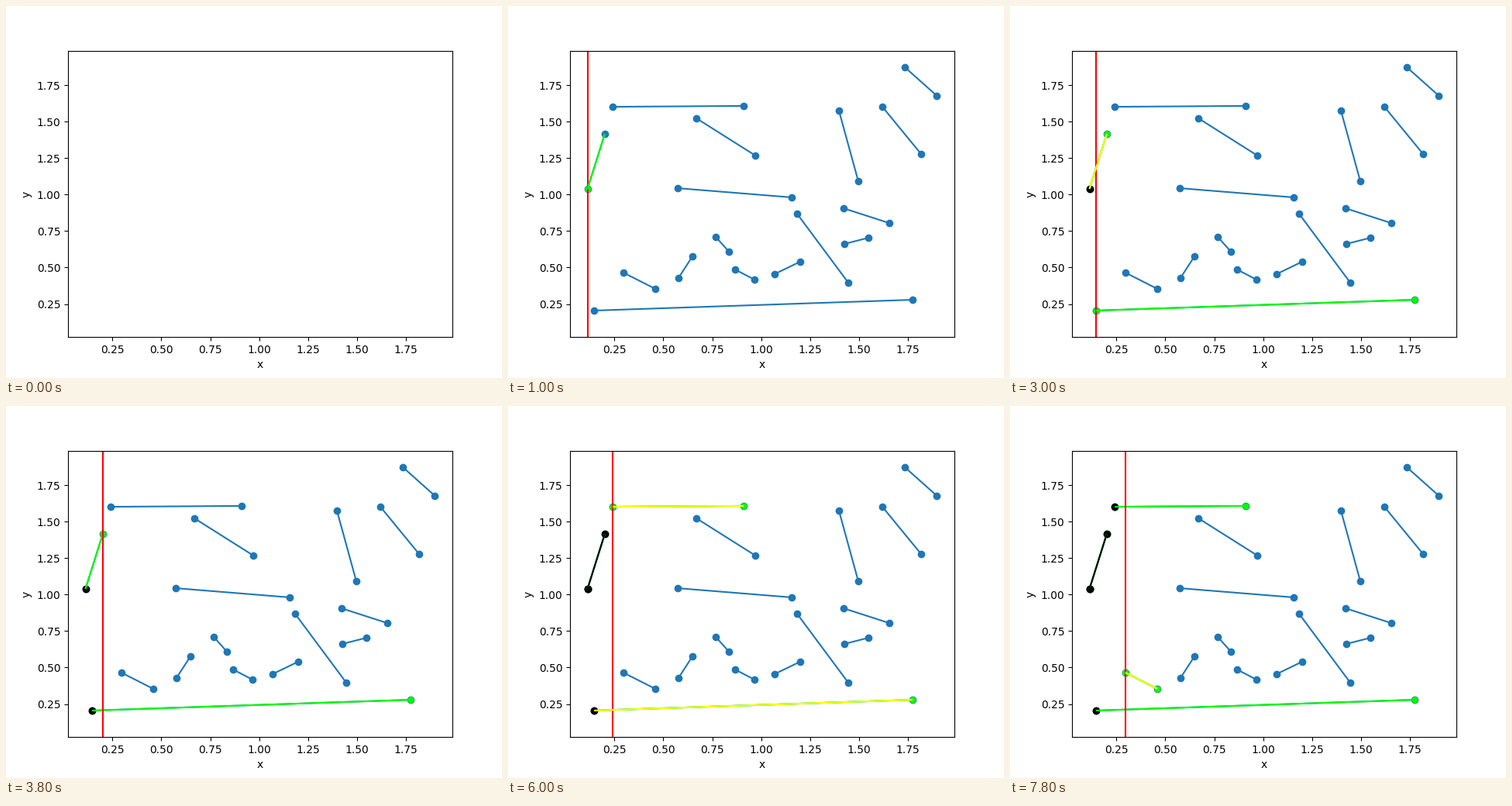
These frames come from a looping animation (640 px wide and 480 px high, 8000 ms). A matplotlib script:

```python
import matplotlib.pyplot as plt
from matplotlib.animation import FuncAnimation
from matplotlib.collections import LineCollection

FRAMES, INTERVAL = 40, 200

# Input of the sweep: (left end, right end) of each segment
SEGMENTS = [
    ((0.1125, 1.039), (0.201, 1.416)), ((0.146, 0.205), (1.774, 0.279)),
    ((0.241, 1.602), (0.910, 1.608)), ((0.296, 0.465), (0.459, 0.354)),
    ((0.574, 1.044), (1.156, 0.981)), ((0.577, 0.428), (0.649, 0.577)),
    ((0.669, 1.523), (0.970, 1.268)), ((0.768, 0.710), (0.835, 0.609)),
    ((0.867, 0.486), (0.966, 0.417)), ((1.068, 0.455), (1.199, 0.540)),
    ((1.183, 0.869), (1.445, 0.396)), ((1.397, 1.576), (1.496, 1.092)),
    ((1.421, 0.906), (1.654, 0.805)), ((1.425, 0.662), (1.548, 0.704)),
    ((1.619, 1.602), (1.817, 1.278)), ((1.734, 1.873), (1.8977, 1.677)),
]
POINTS = [p for seg in SEGMENTS for p in seg]


def padded_range(values, margin=0.05):
    lo, hi = min(values), max(values)
    pad = margin * (hi - lo)
    return lo - pad, hi + pad


LIMITS = padded_range([x for x, _ in POINTS])

fig, ax = plt.subplots(figsize=(6.4, 4.8), dpi=100)
ax.set(xlim=LIMITS, ylim=LIMITS, xlabel="x", ylabel="y")


class Timeline:
    """Every show or hide takes one step of the animation."""

    def __init__(self):
        self.step = 0
        self.spans = []

    def show(self, artist):
        self.step += 1
        span = [artist, self.step, float("inf")]
        self.spans.append(span)
        return span

    def hide(self, span):
        self.step += 1
        span[2] = self.step

    def points(self, pts, color="C0", size=36):
        return self.show(ax.scatter(*zip(*pts), s=size, color=color))

    def highlight(self, point):
        return self.points([point], "lime", 25)

    def lines(self, segs, color="C0"):
        lc = LineCollection(segs, colors=color, linewidths=1.5)
        return self.show(ax.add_collection(lc, autolim=False))

    def sweep(self, x):
        return self.lines([((x, LIMITS[0]), (x, LIMITS[1]))], "red")


def height(seg, x):
    (x0, y0), (x1, y1) = seg
    return y0 + (y1 - y0) * (x - x0) / (x1 - x0)


def compare(tl, a, b):
    marks = [tl.lines([s], "yellow") for s in (a, b)]
    for mark in marks:
        tl.hide(mark)


def insert(tl, seg, active):
    left, right = seg
    tl.lines([seg], "lime")
    tl.highlight(right)
    active.append(seg)
    active.sort(key=lambda s: height(s, left[0]))
    i = active.index(seg)
    for j in (i - 1, i + 1):
        if 0 <= j < len(active):
            compare(tl, seg, active[j])


def remove(tl, seg, active):
    i = active.index(seg)
    tl.lines([seg], "black")
    tl.points([seg[0]], "black")
    active.remove(seg)
    if 0 < i < len(active):
        compare(tl, active[i - 1], active[i])


def build():
    tl = Timeline()
    tl.lines(SEGMENTS)
    tl.points(POINTS)
    events = sorted((p, seg) for seg in SEGMENTS for p in seg)
    active = []
    for point, seg in events:
        if tl.step >= FRAMES:
            break
        line = tl.sweep(point[0])
        tl.highlight(point)
        handle = insert if point == seg[0] else remove
        handle(tl, seg, active)
        tl.points([point], "black")
        tl.hide(line)
    return tl.spans


spans = build()


def update(frame):
    for artist, start, end in spans:
        artist.set_visible(start <= frame < end)
    return [s[0] for s in spans]


anim = FuncAnimation(fig, update, frames=FRAMES, interval=INTERVAL,
                     repeat=True, repeat_delay=0)
plt.show()
```
